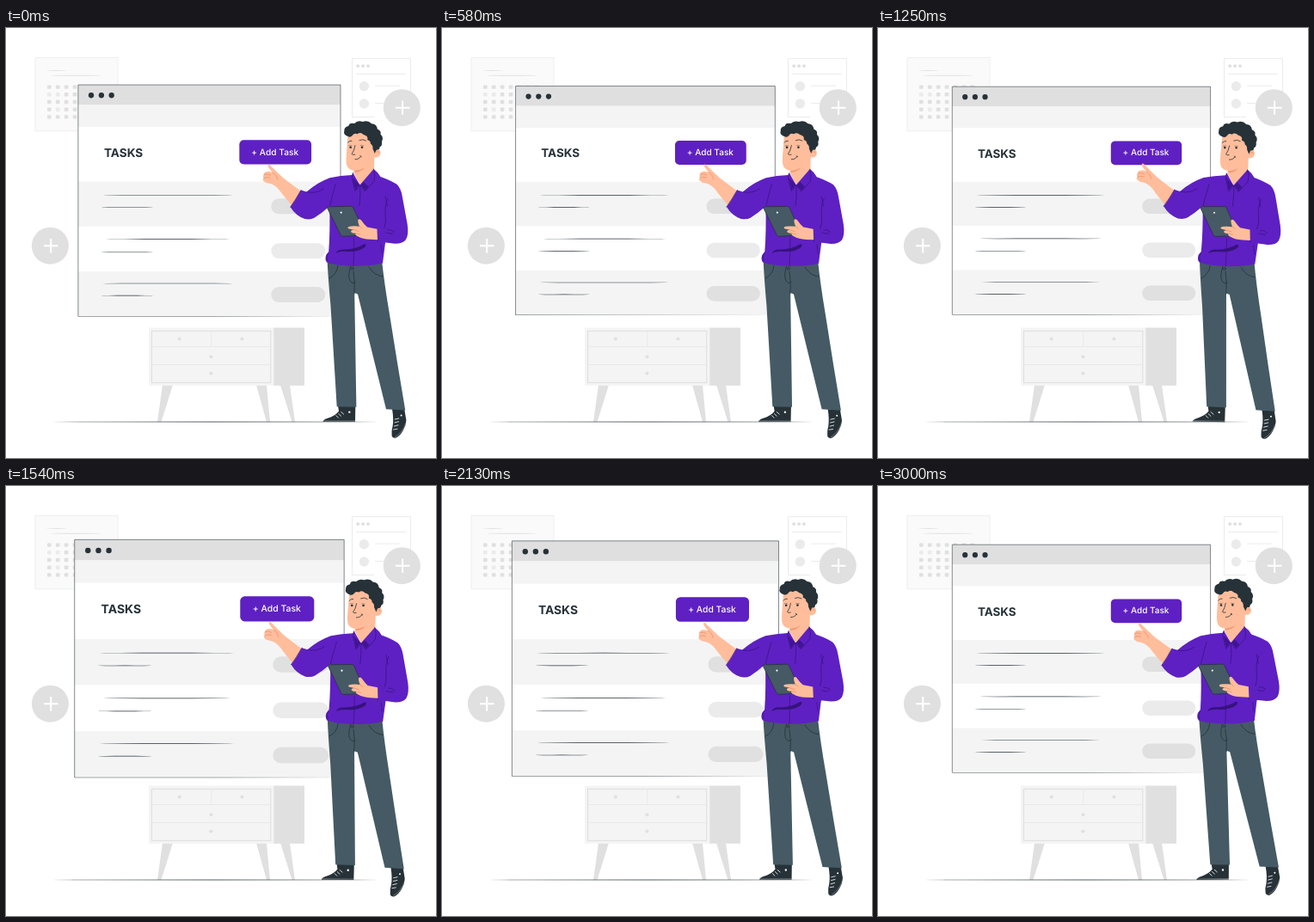
Animation, 500 px wide and 500 px high, one loop 3040 ms. Source, as an HTML page:

```html
<!DOCTYPE html>
<html lang="en">
<head>
<meta charset="utf-8">
<title>Tasks</title>
<style>
  html, body { margin: 0; width: 100%; height: 100%; overflow: hidden; background: #fff; }
  svg { display: block; width: 100vw; height: 100vh; }
  text { font-family: Inter, "Open Sans", sans-serif; text-rendering: geometricPrecision; }
  .ink { fill: #263238; }
  .skin { fill: #ffbd9b; }
  .shirt { fill: #5e20c2; }
  .cloth { fill: #455a64; }
  .g1 { fill: #f4f4f4; }
  .g2 { fill: #ebebeb; }
  .g3 { fill: #e0e0e0; }
  .line { fill: none; stroke: #263238; stroke-width: .8; stroke-linecap: round; stroke-linejoin: round; }
  .fold { fill: none; stroke: #37127c; stroke-width: .7; stroke-linecap: round; stroke-linejoin: round; }
  .crease { fill: none; stroke: #e88a68; stroke-width: .7; stroke-linecap: round; }
  .pale { fill: none; stroke: #e6e6e6; stroke-width: .8; }
  .edge { fill: none; stroke: #263238; stroke-width: .55; }
  .lace { fill: none; stroke: #fff; stroke-width: .8; stroke-linecap: round; }
</style>
</head>
<body>
<svg viewBox="0 0 500 500" xmlns="http://www.w3.org/2000/svg">
  <rect width="500" height="500" fill="#fff"/>

  <!-- calendar card -->
  <rect x="34" y="34.3" width="96" height="85.5" fill="#fafafa" stroke="#ebebeb" stroke-width=".8"/>
  <ellipse cx="59" cy="49.5" rx="12" ry=".4" class="g3"/>
  <ellipse cx="81" cy="55.2" rx="29" ry=".5" class="g3"/>
  <g id="days"></g>

  <!-- list card -->
  <path class="pale" d="M428 103.5H402.5V35.6H470.4V103.5"/>
  <g class="g3">
    <circle cx="409.2" cy="44.2" r="1.9"/><circle cx="415.1" cy="44.2" r="1.9"/><circle cx="421" cy="44.2" r="1.9"/>
  </g>
  <path class="pale" d="M407 53.5H465M429 67.2H458M429 87.5H440"/>
  <circle cx="416.4" cy="67.8" r="5.7" class="g2"/><circle cx="416.4" cy="88" r="5.7" class="g2"/>

  <g id="badges"></g>

  <!-- cabinet -->
  <path class="g3" d="M182 415H194L180.5 458H176ZM291 415H303L307 458H303ZM319 415H330L336 458H332.5Z"/>
  <rect x="166" y="348.5" width="145.5" height="67.3" class="g1"/>
  <rect x="311.3" y="348.5" width="35.7" height="67.3" class="g3"/>
  <rect x="169.5" y="352.3" width="138.3" height="60" fill="none" stroke="#dcdcdc" stroke-width=".9"/>
  <path class="pale" d="M169.5 370.5H307.8M169.5 391.5H307.8M238.7 352.3V370.5"/>
  <g class="g3">
    <circle cx="201.8" cy="361.6" r="2"/><circle cx="274.4" cy="361.6" r="2"/>
    <circle cx="238.4" cy="382.3" r="2"/><circle cx="238.4" cy="401.5" r="2"/>
  </g>
  <path d="M52 458L86 457.7L242 457.5L400 457.7L434 458L400 458.3L242 458.5L86 458.3Z" fill="#263238" opacity=".8"/>

  <!-- window -->
  <g id="panel">
    <rect x="86.3" y="68.2" width="300.3" height="265" fill="#fff"/>
    <rect x="86.3" y="68.2" width="300.3" height="23" fill="#dfdfdf"/>
    <path class="g1" d="M86.3 91.2H386.6V116.3H86.3ZM86.3 179H386.6V230H86.3ZM86.3 281.6H386.6V333.2H86.3Z"/>
    <path class="edge" d="M86.3 333.2V68.2H386.6V333.2"/>
    <path class="ink" d="M86.3 332.95L240 333L386.6 333.2L240 333.4L86.3 333.45Z" opacity=".85"/>
    <g class="ink">
      <circle cx="101.2" cy="80.2" r="3.1"/><circle cx="112.9" cy="80.2" r="3.1"/><circle cx="124.5" cy="80.2" r="3.1"/>
    </g>
    <text x="115.9" y="150.5" font-size="13.4" font-weight="700" class="ink">TASKS</text>
    <rect x="270.8" y="131.4" width="82.4" height="27.8" rx="5" class="shirt"/>
    <text x="284.6" y="148.4" font-size="10" font-weight="500" fill="#fff">+ Add Task</text>
    <g id="rows"></g>
  </g>

  <!-- man -->
  <g id="man">
    <!-- shoes -->
    <path class="ink" d="M386 439H406.3L406 457.8H368.5Q369 455.2 374 453.8Q383 451 387 445.5Z"/>
    <path class="lace" d="M383.8 450.6L386.4 453.2M386.8 448.6L389.6 451.2M389.6 446.4L392.6 449"/>
    <circle cx="399.3" cy="446.6" r="1.2" fill="#fff"/>
    <path class="lace" d="M370 456.8H405.6" stroke-opacity=".35"/>
    <path class="ink" d="M449 443L463.3 443.5L465.4 456Q465.3 462 462 467.5Q458.5 474 453.5 476.6Q449.5 477.3 448.6 474Q448 468 449.6 463Q451 455 449 443Z"/>
    <path class="lace" d="M452.2 455L456.7 454M452 458.8L456.5 457.7M451.4 463L456 461.8M450.6 467L455 466.2"/>
    <circle cx="459.6" cy="450.5" r="1" fill="#fff"/>
    <path class="lace" d="M464.6 460Q461.5 470 452.5 475.6" stroke-opacity=".4"/>

    <!-- trousers -->
    <path class="cloth" d="M373.5 269L437 270Q440 298 446 333Q455 390 464.3 444.5L442 443.2L409 309.5L405.2 308L407.4 440.8L384.7 440.2Q381 380 377.5 323Q374.5 290 373.5 269Z"/>
    <path class="line" d="M405 309Q406 297 404 283M400.5 277Q396.8 290 400.5 294.5Q404 298.5 406.3 295M386 276Q384.8 287 376 291M422 278Q428 288 438.5 289"/>
    <circle cx="402.6" cy="279.5" r="1.5" class="line"/>

    <!-- pointing arm -->
    <path class="skin" d="M344 190.5Q331 181 322.5 174.5Q315 167.5 308.5 161Q305.8 157.9 304.5 159.2Q304.2 161 307.5 165.3L310 168.2Q305.5 166.2 302.4 167.2Q299.2 168.8 300 170.4Q298 172 299.8 174.4Q297.6 176 299.6 178Q302 180.6 306.5 180.8Q312.5 182.3 317.5 188Q324 197 333.5 207.5Z"/>
    <path class="crease" d="M300 170.4Q303.5 168.8 307.5 171M299.8 174.4Q303.5 172.7 307 174.2M310 168.2Q315 171 315.5 176.2"/>

    <!-- neck -->
    <path class="skin" d="M404 158L428.5 145L428 164.5L412 183L404.5 169Z"/>
    <path d="M405 166.2Q414 165.5 418 160.5Q415.5 166.5 406 167.8Z" fill="#f08f6c"/>

    <!-- shirt -->
    <path class="shirt" d="M403.5 168.5L411.5 182.5L427.5 164Q433 168 435.5 173Q447 177 454.5 181.8Q459.3 186.5 460.8 196L466.7 228Q468.5 240 465 246Q461.5 251 452 250.8L432 248.3L430.8 234L439.7 232.7L441.5 246L438 273.5Q422 277.3 402 276.7Q381 276 373 272.5Q370.5 269.5 372.2 264L375.2 260Q377 236 376.2 207.3Q367 215.5 358.5 220.8Q354 223.2 347.5 222Q337 218.5 330.7 208.2Q336.5 201 343 188.6L349.5 190.5Q362 179.5 376.5 174.2Q389 171.6 402 171Z"/>
    <path class="fold" d="M403.5 168.5L402.2 174.5L406 189.5L411.6 182.5L417.5 189.8L428.2 178Q430 171 427.5 164M411.6 182.5Q412.6 194 411 206.5M404.6 244Q405 260 404 276.5"/>
    <path d="M403 174L406 188.5L411 182ZM412.5 182.5L417.5 189L421.5 184.5L416 179Z" fill="#401593"/>
    <path class="fold" d="M444 198Q440.5 205 441 216.5Q442.8 225 439.7 232.7M441 196L443.3 207M383.3 181.5Q380 192 376.4 207.3M343 188.6Q336.5 200 330.7 208.2M350 190.8Q361 193 369 187"/>
    <path class="fold" d="M432 248.3L430.8 234M444 234.4Q448.5 234 451.5 237M442 238Q447 239.5 449.5 239M436 252L437.2 262M374.5 262Q371.6 267 374 270.6"/>
    <path d="M383.5 261.7Q386 256.7 394 257.5Q407 257 416.5 251.2Q420 251.3 417.5 254.8Q410 260.7 396 260Q389 259.3 383.5 261.7Z" fill="#37127c"/>

    <!-- tablet and hand -->
    <path d="M373.6 209.3Q374 207.8 376 207.8L401.5 207.3Q403 207.3 403.8 209L417.5 238.5Q418 240.6 416 241L392 242.3Q390 242.3 389 240.5Z" class="cloth" stroke="#263238" stroke-width=".8"/>
    <circle cx="389.7" cy="214.6" r="1.1" fill="#fff"/>
    <path class="skin" d="M431.5 233.7L420 231.5Q416.5 228.5 413.8 224.5Q411.3 221 409.5 222.7Q408.7 225 411 230.7Q404 230 399.5 230.8Q396.5 231.6 398 233.3L404.5 234.8Q400.5 235.3 401.2 237.2Q403 238.7 406.5 238.8Q405.5 240.8 409 242.3Q414.5 245.6 423 245.8L432 246.2Z"/>
    <path class="crease" d="M404.5 234.8L410 236.5M406.5 238.8L411.5 239.7M411 230.7L414 233"/>

    <!-- head -->
    <g transform="translate(.7 0)">
      <path class="skin" d="M397 122Q396 136 395.2 146Q394 158 396.5 161.8Q400 166.2 407 165.6Q416 164.3 421.5 158Q425 154.3 427.5 150.2Q433.5 151.3 434.8 146Q435 140.5 430 140L424 120Z"/>
      <path class="ink" d="M398 126.5Q391 124.5 392.6 119.5Q392.4 115 397.5 114Q398.5 109.5 404.5 111Q408 107 414 109Q420 106.5 424.5 111.2Q430.5 111.5 431.2 117.5Q436 119.5 434.8 123.5Q438.8 127.5 436.2 132Q437.3 137 433.8 138.5Q434 142 430.4 141.5Q428.8 143.5 428.2 146L425.8 140.5Q426.3 136.5 423.2 134.5Q423.5 131 419.5 130Q421 125.5 415 124Q411.5 120.5 408 123.3Q404.3 121.5 402.5 124.6Q400.7 127.2 398 126.5Z"/>
      <path class="crease" d="M429.5 144.5Q432.5 142 433 145"/>
      <path class="line" d="M396.8 133.2Q398.4 130.8 401.3 131.2M410.3 130.5Q414 128.6 417.8 131M405.3 136.5Q404.4 142.5 401.4 146.5Q402.5 148 405 147.2M405.3 152.7Q409.6 153 412 149.2M411 148.5L412.6 149.8"/>
      <circle cx="400" cy="138.8" r="1.3" class="ink"/><circle cx="413.3" cy="138.7" r="1.3" class="ink"/>
      <path class="line" d="M398 136.8L401.2 136.6M411.6 136.5L415 136.8" stroke-opacity=".5"/>
    </g>
  </g>
</svg>
<script>
  const $ = id => document.getElementById(id);

  const days = [];
  for (let r = 0; r < 5; r++)
    for (let c = 0; c < 7; c++) {
      const tone = (r === 1 && c < 2) || (r === 3 && c === 1) ? 'g2' : 'g3';
      days.push(`<rect x="${48 + c * 9.9}" y="${66.4 + r * 8.7}" width="4.6" height="4.4" rx=".8" class="${tone}"/>`);
    }
  $('days').innerHTML = days.join('');

  $('badges').innerHTML = [[460.3, 92.7], [51.4, 253.2]].map(([x, y]) =>
    `<circle cx="${x}" cy="${y}" r="21.5" class="g3"/>
     <path d="M${x - 7.5} ${y}h16.6M${x + .8} ${y - 8.3}v16.6" stroke="#fff" stroke-width="2"/>`).join('');

  // half length and y of the long rule, y of the short rule, y and tone of the pill
  const rows = [
    [75, 194.4, 208.6, 207.2, 'g3'],
    [71, 244.9, 259.3, 258.2, 'g2'],
    [75, 295.5, 309.4, 308.3, 'g3']
  ];
  $('rows').innerHTML = rows.map(([half, y1, y2, y3, tone]) =>
    `<ellipse cx="189" cy="${y1}" rx="${half}" ry=".32" class="ink"/>
     <ellipse cx="142.3" cy="${y2}" rx="30" ry=".32" class="ink"/>
     <rect x="307.2" y="${y3 - 8.8}" width="62" height="17.6" rx="8.8" class="${tone}"/>`).join('');

  // linear interpolation through [position, value] steps
  function along(steps, p) {
    const i = Math.max(1, steps.findIndex(s => s[0] >= p));
    const [a, u] = steps[i - 1], [b, v] = steps[i];
    return u + (v - u) * (p - a) / (b - a);
  }

  const BEAT = [[0, 1], [.1, 1.1], [.3, 1], [.4, 1], [.5, 1.1], [.6, 1], [1, 1]];
  const SWAY = [[0, 0], [.25, 1], [.75, -1], [1, 0]];
  const LOOP = 3040, TICK = 1000 / 24, LEAD = 24, DELAY = 500;

  function draw(ms) {
    const tick = Math.min(72, Math.floor((ms % LOOP + 5) / TICK));
    const t = tick * TICK + LEAD;
    const scale = along(BEAT, Math.min(t, 2999) % 1500 / 1500);
    const angle = t < DELAY ? 0 : along(SWAY, (t - DELAY) / 3000);
    $('panel').setAttribute('transform', `translate(236.5 200.7) scale(${scale}) translate(-236.5 -200.7)`);
    $('man').setAttribute('transform', `rotate(${angle} 382.5 293)`);
  }

  const start = performance.now();
  function loop() {
    draw(performance.now() - start);
    requestAnimationFrame(loop);
  }
  loop();
</script>
</body>
</html>
```
